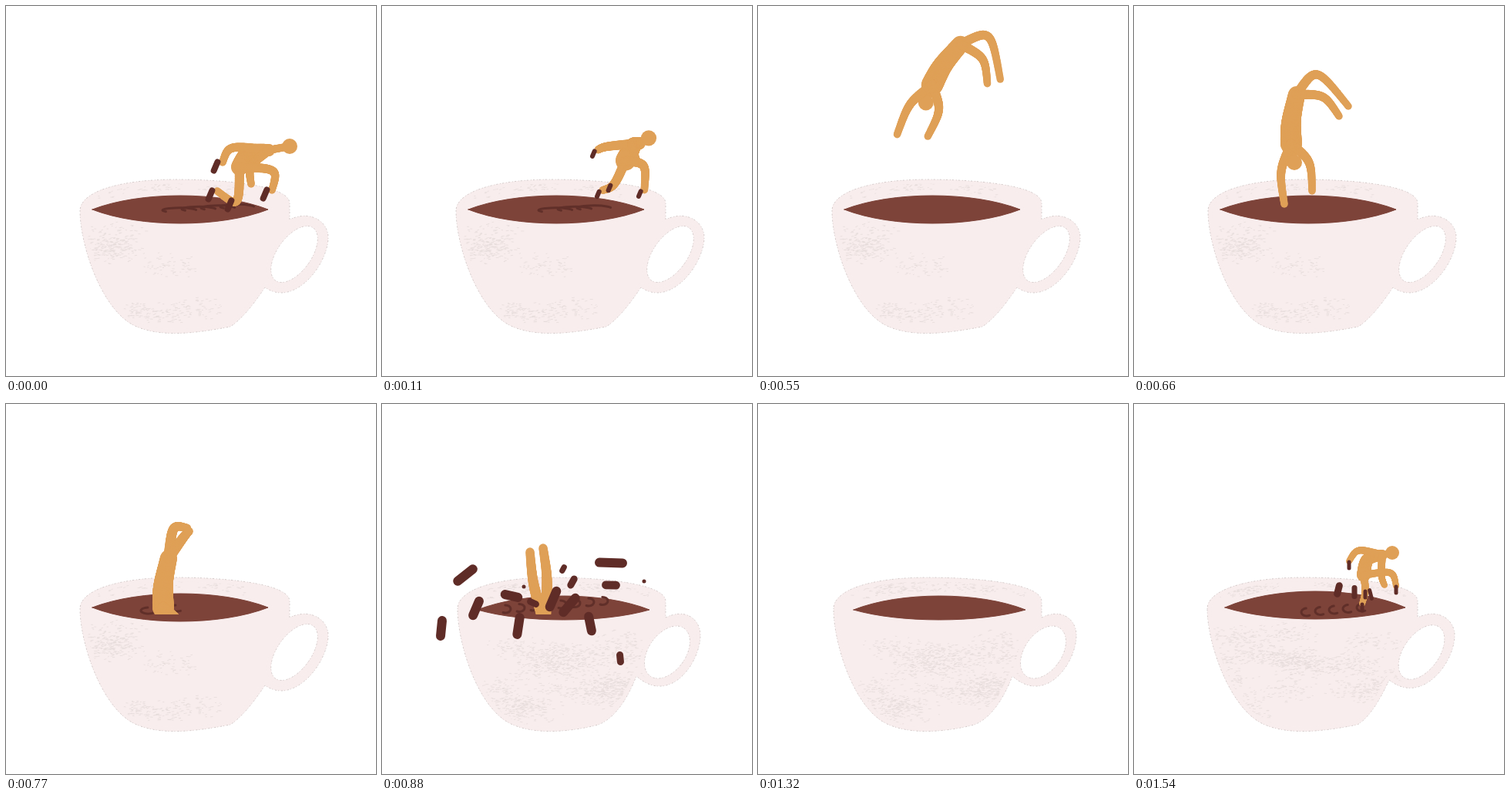
Recreate the animation shown at these times as an HTML page with a canvas. Size 480x480 px, loop 1.65 s.

```html
<!DOCTYPE html>
<html lang="en">
<head>
<meta charset="utf-8">
<title>Coffee dive</title>
<style>
html, body { margin: 0; width: 100%; height: 100%; overflow: hidden; background: #fff; }
canvas { display: block; width: 100vmin; height: 100vmin; }
</style>
</head>
<body>
<canvas id="stage" width="480" height="480"></canvas>
<script>
const ctx = document.getElementById('stage').getContext('2d');
const STEP = 110, STEPS = 15, WATERLINE = 273;
const CHINA = '#f8eded', GRAIN = '#e6dcdb', COFFEE = '#7d4339', SKIN = '#dfa057', DARK = '#5f2c27';

const mix = (a, b, t) => a + (b - a) * t;

function random(seed) {
  return () => (seed = seed * 16807 % 2147483647) / 2147483647;
}

// ---- Cup ----

const cups = [
  { left: 96, tip: 418, joint: [336, 365], base: 291, hole: [374, 22, 42],
    coffee: { left: 112, right: 340, top: 246, mid: 264, bottom: 282 }, seed: 41, patches: 11 },
  { left: 98, tip: 413, joint: [330, 353], base: 281, hole: [370, 24, 38],
    coffee: { left: 124, right: 347, top: 249, mid: 267, bottom: 280 }, seed: 97, patches: 28 },
  { left: 95, tip: 416, joint: [331, 358], base: 290, hole: [373, 23, 40],
    coffee: { left: 118, right: 352, top: 243, mid: 264, bottom: 279 }, seed: 213, patches: 28 }
];

function cupShape({ left, tip, joint, base, hole: [x, rx, ry] }) {
  const shape = new Path2D(`M${left} 266 C${left} 240 150 225 220 225 C280 225 368 232 368 256
    L368 277 C395 264 ${tip} 280 ${tip} 300 C${tip} 335 374 392 ${joint} Q310 404 ${base} 416
    C250 424 205 430 172 417 C125 400 ${left} 310 ${left} 266Z`);
  const hole = new Path2D();
  hole.ellipse(x, 322, rx, ry, 0.62, 0, 2 * Math.PI);
  shape.addPath(hole);
  return shape;
}

function coffeeShape({ left, right, top, mid, bottom }) {
  const inset = (right - left) * 0.27;
  const a = left + inset, b = right - inset;
  const up = mix(mid, top, 4 / 3), down = mix(mid, bottom, 4 / 3);
  return new Path2D(`M${left} ${mid} C${a} ${up} ${b} ${up} ${right} ${mid}
    C${b} ${down} ${a} ${down} ${left} ${mid}Z`);
}

// Chalky patches of short strokes; every fifth one lies on the back rim
function drawGrain(seed, patches) {
  const rnd = random(seed);
  const spread = () => rnd() + rnd() - 1;
  ctx.strokeStyle = GRAIN;
  ctx.lineWidth = 0.8;
  ctx.beginPath();
  for (let p = 0; p < patches; p++) {
    const x = mix(120, 330, rnd());
    const y = p % 5 ? mix(292, 405, rnd()) : 237;
    for (let i = 0; i < 65; i++) {
      const px = x + spread() * 42, py = y + spread() * 17;
      ctx.moveTo(px, py);
      ctx.lineTo(px + 1 + rnd() * 2.5, py + rnd() - 0.7);
    }
  }
  ctx.stroke();
}

function drawCup(cup) {
  const shape = cupShape(cup), surface = coffeeShape(cup.coffee);
  ctx.fillStyle = CHINA;
  ctx.fill(shape, 'evenodd');
  ctx.save();
  ctx.clip(shape, 'evenodd');
  drawGrain(cup.seed, cup.patches);
  ctx.strokeStyle = CHINA;
  ctx.lineWidth = 11;
  ctx.stroke(shape);
  ctx.stroke(surface);
  ctx.restore();
  ctx.save();
  ctx.strokeStyle = '#b9b0af';
  ctx.lineWidth = 0.6;
  ctx.lineCap = 'butt';
  ctx.setLineDash([1, 2, 2, 3]);
  ctx.stroke(shape);
  ctx.restore();
  ctx.fillStyle = ctx.strokeStyle = COFFEE;
  ctx.lineWidth = 1;
  ctx.fill(surface);
  ctx.stroke(surface);
}

// ---- Figure ----

// Joints: head, shoulder, back, hip, then elbow + hand twice, knee + foot twice.
// Girth: radius of limbs, shoulder, hip.
function pose(text, girth) {
  const n = text.split(' ').map(Number);
  return { joints: Array.from({ length: n.length / 2 }, (_, i) => [n[2 * i], n[2 * i + 1]]), girth };
}

function move({ joints, girth }, dx, dy, turn = 0) {
  const c = Math.cos(turn), s = Math.sin(turn);
  return { girth, joints: joints.map(([x, y]) => {
    const u = x - 210, v = y - 150;
    return [210 + dx + u * c - v * s, 150 + dy + u * s + v * c];
  }) };
}

function blend(a, b, t) {
  return {
    joints: a.joints.map(([x, y], i) => [mix(x, b.joints[i][0], t), mix(y, b.joints[i][1], t)]),
    girth: a.girth.map((r, i) => mix(r, b.girth[i], t))
  };
}

const climb = pose('368 182 341 187 315 190 303 209 294 184 281 203 318 208 318 231 299 253 274 240 346 214 345 239', [5, 8, 11]);
const windUp = pose('302 150 320 160 346 166 342 184 288 179 279 154 336 121 357 145 305 187 311 237 326 195 331 238', [5.3, 8, 17]);
const dive = pose('208 203 204 179 204 150 211 115 191 215 195 257 227 203 231 240 238 89 278 130 245 118 266 143', [5, 14, 11]);
const emerge = pose('335 193 322 196 303 202 298 222 292 190 279 204 321 222 325 235 300 242 296 259 332 219 340 236', [4, 7, 9]);
const apex = move(dive, 35, -70, 0.5);
const sunk = move(dive, 0, 170);
sunk.joints.splice(-4, 4, [197, 235], [192, 192], [214, 230], [209, 187]);
sunk.girth = [6, 14, 11];

const keys = [
  [0, climb], [3, windUp], [5, apex], [6, dive], [8, sunk], [9, move(dive, 0, 250)],
  [12, move(emerge, 0, 120)], [13, move(emerge, 0, 45)], [14, emerge]
];

function poseAt(step) {
  const next = Math.max(1, keys.findIndex(([at]) => at >= step));
  const [[t0, a], [t1, b]] = [keys[next - 1], keys[next]];
  return blend(a, b, (step - t0) / (t1 - t0));
}

function oval(x, y, rx, ry = rx) {
  ctx.beginPath();
  ctx.ellipse(x, y, rx, ry, 0, 0, 2 * Math.PI);
  ctx.fill();
}

// Tapered tube that bends through its middle joint
function tube(a, m, b, r0, r1) {
  const at = (t, k) => {
    const pull = (8 * m[k] - a[k] - b[k]) / 6, s = 1 - t;
    return s * s * s * a[k] + 3 * s * t * pull + t * t * t * b[k];
  };
  for (let t = 0; t <= 1; t += 1 / 80) oval(at(t, 0), at(t, 1), mix(r0, r1, t));
}

function drawFigure({ joints, girth: [limb, chest, seat] }) {
  const [head, shoulder, back, hip, ...ends] = joints;
  ctx.save();
  ctx.beginPath();
  ctx.rect(0, 0, 480, WATERLINE);
  ctx.clip();
  ctx.fillStyle = SKIN;
  tube(shoulder, back, hip, chest, seat);
  tube(shoulder, shoulder, head, limb, limb);
  oval(...head, limb + 5, limb + 5);
  for (let i = 0; i < 8; i += 2) {
    tube(i < 4 ? shoulder : hip, ends[i], ends[i + 1], limb * 1.25, limb * 0.95);
  }
  ctx.restore();
}

// ---- Liquid ----

function drop(x, y, length, tilt, width) {
  const dx = Math.sin(tilt) * length / 2, dy = Math.cos(tilt) * length / 2;
  ctx.strokeStyle = DARK;
  ctx.lineWidth = width;
  ctx.beginPath();
  ctx.moveTo(x - dx, y + dy);
  ctx.lineTo(x + dx, y - dy);
  ctx.stroke();
}

function ripples(x, y, count, gap, rx, ry, from = 1) {
  ctx.strokeStyle = '#602f29';
  ctx.lineWidth = 3;
  for (let i = 0; i < count; i++) {
    ctx.beginPath();
    ctx.ellipse(x + i * gap, y - i * 1.5, rx, ry, 0, from, from + 3.6);
    ctx.stroke();
  }
}

// Coffee running off hands, knee and feet
function drips({ joints }, dx, length, tilt, width) {
  for (const i of [5, 8, 9, 11]) drop(joints[i][0] + dx, joints[i][1] + 5, length, tilt, width);
}

const splash = [
  [108, 222, 25, 0.9], [77, 291, 20, 0.1], [122, 265, 20, 0.4], [177, 288, 22, 0.15],
  [297, 206, 30, 1.6], [247, 231, 9, 0.5], [297, 235, 13, 1.6], [168, 249, 17, 1.8],
  [222, 253, 22, 0.4], [243, 261, 24, 0.7], [270, 285, 19, -0.2], [309, 330, 9, -0.1],
  [196, 258, 8, 2], [235, 214, 5, 0.5], [184, 237, 0, 0], [340, 230, 0, 0]
];

function drawSplash(fall, size) {
  for (const [x, y, length, tilt] of splash) {
    drop(x, y + fall, length * size, tilt, Math.min(12, 5 + length * 0.45) * size);
  }
}

function drawLiquid(step, figure) {
  if (step === 0) drips(figure, -9, 12, 0.4, 8);
  if (step === 1) drips(figure, -6, 7, 0.4, 6);
  if (step === 14) {
    drips(figure, 0, 8, 0, 5);
    for (let i = 0; i < 3; i++) drop(265 + i * 21, 241 + i * 3, 11, 0.25 - i * 0.25, 9 - i * 2);
  }
  if (step === 8) drawSplash(0, 1);
  if (step === 9) drawSplash(25, 0.5);
}

function drawRipples(step) {
  if (step < 2) ripples(225, 265, 4 - step, 25, 22, 3, 2.5);
  if (step === 7) ripples(185, 268, 3, 18, 10, 4);
  if (step === 8 || step === 9) ripples(160, 266, 8, 18, 7, 5, -1.6);
  if (step > 12) ripples(224, 270, 5, 18, 7, 5);
}

function draw(step) {
  const figure = poseAt(step);
  ctx.clearRect(0, 0, 480, 480);
  drawCup(cups[step < 8 ? 0 : step < 13 ? 1 : 2]);
  drawRipples(step);
  drawFigure(figure);
  drawLiquid(step, figure);
}

// ---- Loop ----

ctx.lineCap = ctx.lineJoin = 'round';
const start = performance.now();
let shown = -1;

function tick() {
  const step = Math.floor((performance.now() - start) / STEP) % STEPS;
  if (step !== shown) draw(shown = step);
  requestAnimationFrame(tick);
}
tick();
</script>
</body>
</html>
```
